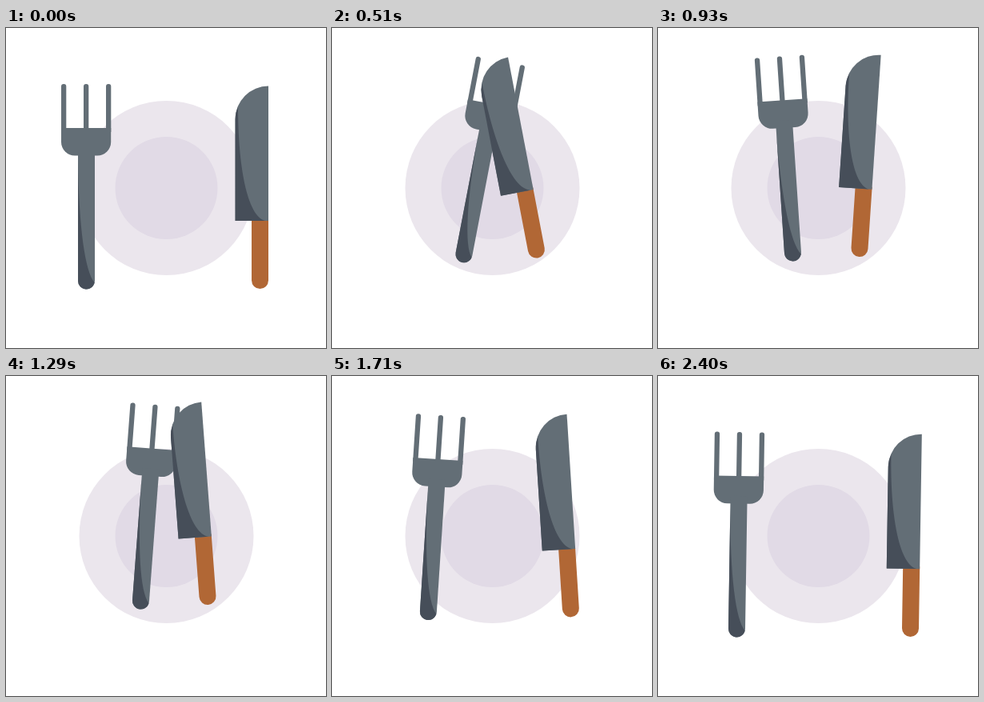
An HTML page with a canvas that plays this animation: 400x400 px, repeating every 4.49 s.

```html
<!DOCTYPE html>
<html lang="en">
<head>
<meta charset="utf-8">
<title>Cutlery</title>
<style>
html, body { margin: 0; width: 100%; height: 100%; overflow: hidden; background: #fff; }
canvas { display: block; width: 100vw; height: 100vh; }
</style>
</head>
<body>
<canvas id="stage" width="400" height="400"></canvas>
<script>
const ctx = document.getElementById('stage').getContext('2d');
const LOOP = 4490, STEP = 30, LAST = 80;
const STEEL = '#636e76', SHADE = '#464e59', WOOD = '#b16735';

const span = (a, b, t) => Math.min(1, Math.max(0, (t - a) / (b - a)));
const ease = (a, b, t) => {
  const u = span(a, b, t);
  return u * u * (3 - 2 * u);
};
const mix = (a, b, u) => a + (b - a) * u;

// Sharpening strokes in degrees; each is a little quicker than the last
function stroke(t) {
  const phase = 3.24 * Math.exp(0.018 * t) - 3.55;
  return (3.7 - 8 * Math.cos(Math.PI * phase)) * ease(0, 4, t);
}

// The tools mirror each other: side is 1 for the fork, -1 for the knife
function place(tool, t) {
  const { side, px, py, reach, lift, rise } = tool;
  const inward = ease(3.2, 19.2, t) - ease(50.9, 60.4, t);
  const up = ease(rise, 18.5, t) - ease(53.3, 62.3, t);
  const dip = 3 * Math.sin(Math.PI * span(56, 70, t));
  const drift = -2 * ease(61, 70, t);
  const angle = mix(side * stroke(t), 0.9, ease(56, 62, t));

  ctx.save();
  ctx.translate(px + side * reach * inward + drift, py - lift * up + dip);
  ctx.rotate(angle * Math.PI / 180);
  ctx.translate(-px, -py);
  tool.draw();
  ctx.restore();
}

function box(x, y, w, h, r) {
  ctx.beginPath();
  ctx.roundRect(x, y, w, h, r);
  ctx.fill();
}

function disc(r, color) {
  ctx.fillStyle = color;
  ctx.beginPath();
  ctx.arc(200.5, 200, r, 0, Math.PI * 2);
  ctx.fill();
}

const fork = {
  side: 1, px: 100, py: 316, reach: 68, lift: 35, rise: 7.4,
  draw() {
    ctx.fillStyle = STEEL;
    for (let i = 0; i < 3; i++) box(69 + 28 * i, 70, 6.3, 60, [3, 3, 0, 0]);
    box(69, 125, 62.2, 34.5, [0, 0, 17, 17]);
    box(90, 150, 21, 176.5, [0, 0, 10.5, 10.5]);
    ctx.fillStyle = SHADE;
    ctx.beginPath();
    ctx.moveTo(90, 165);
    ctx.bezierCurveTo(91, 250, 99, 305, 110.6, 318);
    ctx.arc(100.5, 316, 10.5, 0.2, Math.PI);
    ctx.fill();
  }
};

const knife = {
  side: -1, px: 317.5, py: 315.5, reach: 65.5, lift: 40, rise: 6,
  draw() {
    ctx.fillStyle = WOOD;
    box(307, 238, 21, 88, [0, 0, 10.5, 10.5]);
    ctx.fillStyle = STEEL;
    box(286.6, 72.5, 41.4, 168.5, [41.4, 0, 0, 0]);
    ctx.fillStyle = SHADE;
    ctx.beginPath();
    ctx.moveTo(290, 99);
    ctx.bezierCurveTo(290, 170, 301, 235, 324, 241);
    ctx.lineTo(286.6, 241);
    ctx.lineTo(286.6, 114);
    ctx.quadraticCurveTo(286.6, 106, 290, 99);
    ctx.fill();
  }
};

const start = performance.now();

function render() {
  const ms = Math.max(0, performance.now() - start) % LOOP;
  const t = Math.min(LAST, Math.floor(ms / STEP));
  ctx.fillStyle = '#fff';
  ctx.fillRect(0, 0, 400, 400);
  disc(109, '#ebe6ed');
  disc(64, '#e1dae6');
  place(fork, t);
  place(knife, t);
  requestAnimationFrame(render);
}
render();
</script>
</body>
</html>
```
